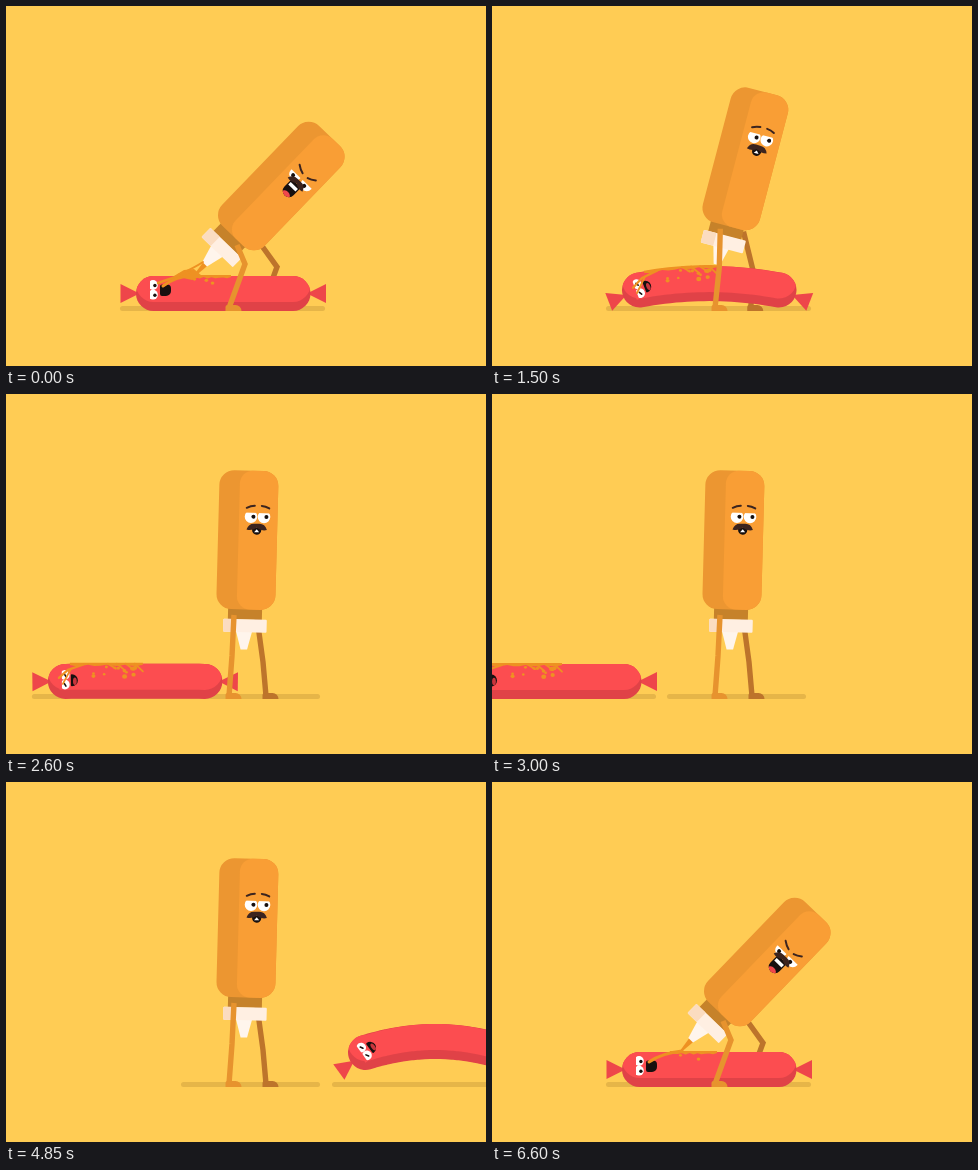
These frames come from a looping animation (480x360 px, 6.65 s). An HTML page with a canvas:

```html
<!DOCTYPE html>
<html lang="en">
<head>
<meta charset="utf-8">
<title>Mustard and sausage</title>
<style>
  html, body { margin: 0; width: 100%; height: 100%; overflow: hidden; background: #ffcc54; }
  canvas { display: block; width: 100vw; height: 100vh; }
</style>
</head>
<body>
<canvas id="stage" width="480" height="360"></canvas>
<script>
const c = document.getElementById('stage').getContext('2d');
const LOOP = 6650, STEP = 50;
const SPRAY = 6350;
const LEFT = 147.5, RIGHT = 287, MID = (LEFT + RIGHT) / 2, HALF = MID - LEFT;
const COL = {
  sky: '#ffcc54', shadow: '#e6b548', light: '#f99e35', side: '#ec9631', neck: '#c6822a',
  cap: '#ffefe2', capSide: '#fbdcc0', leg: '#e7932e', backLeg: '#bd742b',
  sausage: '#fc4d50', under: '#e04247', tail: '#ee464a', mustard: '#ee9122',
  dark: '#3c241f', black: '#17100f', white: '#fff'
};

const mix = (a, b, u) => a + (b - a) * u;
const between = (a, b, u) => [mix(a[0], b[0], u), mix(a[1], b[1], u)];
const clamp = u => Math.min(1, Math.max(0, u));
const rnd = n => Math.abs(Math.sin(n * 127.1 + 11.7) * 43758.5453) % 1;

function ease(from, to, t) {
  const u = clamp((t - from) / (to - from));
  return u * u * (3 - 2 * u);
}

// 1 at the ends of the loop, 0 in its middle
const dip = (a, b, d, e, t) => 1 - ease(a, b, t) + ease(d, e, t);

function poly(pts, color) {
  c.fillStyle = color;
  c.beginPath();
  pts.forEach(p => c.lineTo(...p));
  c.closePath();
  c.fill();
}

function line(pts, width, color, cap = 'round') {
  c.strokeStyle = color;
  c.lineWidth = width;
  c.lineCap = cap;
  c.lineJoin = cap === 'round' ? 'round' : 'miter';
  c.beginPath();
  pts.forEach(p => c.lineTo(...p));
  c.stroke();
}

function curve(a, b, d, width, color) {
  c.strokeStyle = color;
  c.lineWidth = width;
  c.lineCap = 'round';
  c.beginPath();
  c.moveTo(...a);
  c.quadraticCurveTo(...b, ...d);
  c.stroke();
}

function oval(x, y, rx, ry, color) {
  c.fillStyle = color;
  c.beginPath();
  c.ellipse(x, y, rx, ry, 0, 0, 7);
  c.fill();
}

function box(x, y, w, h, r, color) {
  c.fillStyle = color;
  c.beginPath();
  c.roundRect(x, y, w, h, r);
  c.fill();
}

function group(x, y, angle, draw) {
  c.save();
  c.translate(x, y);
  c.rotate(angle);
  draw();
  c.restore();
}

// hops away to the left speeding up, comes back from the right slowing down
function hopAt(t) {
  const leaving = t < 3900;
  const x = leaving
    ? -155 * Math.max(0, (t - 1725) / 1275) ** 1.5
    : 212 * Math.max(0, (5850 - t) / 1000) ** 1.37;
  const active = t > 1300 && t < 5850;
  const turn = leaving ? (t - 1300) / 425 : (t - 4650) / 400;
  const up = active ? Math.sin(Math.PI * turn) ** 2 : 0;
  const power = leaving ? 0 : (x / 212) ** 2;
  return { x, lift: up * (3.5 + 13.5 * power), bend: up * (6.5 + 4.5 * power) };
}

function leg(hip, knee, ankleX, color) {
  line([hip, knee, [ankleX, 302]], 5.4, color, 'butt');
  box(ankleX - 3.5, 299, 16, 6, [2, 6, 0, 0], color);
}

function sausageFace(spraying) {
  const drop = spraying ? 0 : 2;
  for (const y of [-8.5 + drop, 1.2 + drop]) {
    oval(-.5, y, 4.8, 4.9, COL.white);
    if (spraying) oval(1.4, y + .5, 1.7, 1.7, COL.black);
    else line([[-1, y - 1], [.5, y + 1.5]], 1.6, COL.black);
    c.fillStyle = COL.sausage;
    c.fillRect(-6, y - 5, 2.5, 10);
  }
  if (spraying) {
    box(6.5, -9, 11, 11.5, [2, 4, 5, 2], COL.black);
  } else {
    box(5.5, -7, 7, 12, [1, 6, 6, 1], COL.black);
    oval(9.5, 0, 1.9, 3.8, '#c8353c');
  }
}

function splatter(t, warp) {
  const age = (t - SPRAY + LOOP) % LOOP;
  if (age > 4200) return;
  const from = mix(178, 152, clamp((age - 300) / 700));
  const upper = [], lower = [];
  for (let i = 0; i <= 12; i++) {
    const x = mix(from, 225, i / 12);
    upper.push(warp(x, 269));
    lower.unshift(warp(x, 271 + 1.6 * Math.sin(x * .35) ** 2));
  }
  poly(upper.concat(lower), COL.mustard);

  for (let i = 0; i < 12; i++) {
    if (age < 150 + i * 60) break;
    const r = 1.2 + 1.3 * rnd(i + 40);
    oval(...warp(175 + 46 * rnd(i), 273 + 10 * rnd(i + 20) ** 1.5), r, r * .9, COL.mustard);
  }
  for (let i = 0; i < 4; i++) {
    const x = 190 + i * 9;
    if (age > 600 + i * 90) line([warp(x, 270), warp(x + 8, 274 + 4 * rnd(i))], 1.8, COL.mustard);
  }
  if (age > 800) {
    line([warp(165, 271), warp(150, 276), warp(141, 284)], 2.2, COL.mustard);
    line([warp(153, 275), warp(145, 290)], 1.8, COL.mustard);
  }
}

function sausage(t) {
  const { x, lift, bend } = hopAt(t);
  const y = 287.5 - lift;
  const tilt = 4 * bend / HALF;
  const warp = (px, py) =>
    [px, py - lift - bend * Math.max(-.3, 1 - ((px - MID) / HALF) ** 2)];
  c.save();
  c.translate(x, 0);

  const tail = [[-14, 0], [-33, -9.5], [-33, 9.5]];
  group(LEFT, y, -tilt, () => poly(tail, COL.tail));
  group(RIGHT, y, Math.PI + tilt, () => poly(tail, COL.tail));

  const spine = [...Array(25).keys()].map(i => warp(mix(LEFT, RIGHT, i / 24), 287.5));
  const shifted = dy => spine.map(([px, py]) => [px, py + dy]);
  line(spine, 35, COL.under);

  // the lit upper side, kept inside the body outline
  c.save();
  c.beginPath();
  shifted(-17.5).forEach(p => c.lineTo(...p));
  c.arc(RIGHT, y, 17.5, -Math.PI / 2, Math.PI / 2);
  shifted(17.5).reverse().forEach(p => c.lineTo(...p));
  c.arc(LEFT, y, 17.5, Math.PI / 2, Math.PI * 1.5);
  c.clip();
  line(shifted(-9), 35, COL.sausage);
  c.restore();

  group(LEFT, y, -tilt, () => sausageFace(t < 1150 || t > SPRAY));
  splatter(t, warp);
  c.restore();
}

function bottleFace(t) {
  const anger = dip(800, 1300, 5450, 5850, t);
  const laugh = dip(800, 1300, 5700, 6250, t);
  const blink = Math.abs(t - 3950) < 60 || Math.abs(t - 4600) < 60;
  const lid = blink ? .9 : mix(.2, .45, anger);
  const eyeY = mix(-93, -88, anger), r = 6.3;

  for (const ex of [mix(3, 2, laugh), mix(16, 17.5, laugh)]) {
    c.save();
    c.beginPath();
    c.rect(ex - 8, eyeY - r + lid * 2 * r, 16, 16);
    c.clip();
    oval(ex, eyeY, r, r, COL.white);
    oval(ex + mix(2.4, -1, anger), eyeY + anger * 2.5, 2, 2, COL.black);
    c.restore();
  }

  const arch = mix(-1, 1, anger);
  const brow = (outer, inner) => {
    const a = [outer, mix(-101.7, -97.5, anger)], b = [inner, mix(-104, -93.5, anger)];
    const [mx, my] = between(a, b, .5);
    curve(a, [mx, my + arch], b, 2, COL.dark);
  };
  brow(-1.5, 6.5);
  brow(21, 13.5);

  const w = mix(4.6, 6.3, laugh), bottom = mix(-75, -65, laugh);
  c.save();
  c.beginPath();
  c.roundRect(9 - w, -82, 2 * w, bottom + 82, [0, 0, w, w]);
  c.clip();
  c.fillStyle = COL.black;
  c.fillRect(0, -82, 20, 20);
  if (laugh > .3) {
    oval(9, -66, 5, 4, '#f0484c');
    c.fillStyle = COL.white;
    c.fillRect(4, -79, 10, 3.6);
  } else {
    poly([[6.5, -77.5], [9, -80.5], [11.5, -77.5]], COL.white);
  }
  c.restore();

  // moustache
  c.fillStyle = COL.dark;
  c.beginPath();
  c.moveTo(-1.2, -80);
  c.quadraticCurveTo(1, -86.5, 7, -86);
  c.lineTo(11, -86);
  c.quadraticCurveTo(17, -86.5, 19.2, -80);
  c.quadraticCurveTo(14, -78.5, 9, -82);
  c.quadraticCurveTo(4, -78.5, -1.2, -80);
  c.fill();
}

function bottle(t, base, lean, spraying) {
  group(...base, lean * Math.PI / 180, () => {
    if (spraying) poly([[-3.5, 38], [2.5, 38], [.8, 55], [-1, 55]], COL.mustard);
    box(-17.5, -3, 34, 13, 0, COL.neck);
    poly([[-9, 22], [7, 22], [2.5, 40], [-4, 40]], '#fff5ec');
    box(-22, 9.7, 43.5, 13, 1, COL.cap);
    box(-22, 9.7, 13, 13, 1, COL.capSide);
    box(-29.5, -139, 59, 139, 15, COL.side);
    box(-9, -139, 38.5, 139, [13, 15, 15, 13], COL.light);
    bottleFace(t);
  });
}

function stream(t) {
  curve([190, 269], [170, 270 + Math.sin(t / 40)], [157, 280], 3, COL.mustard);
  // short bursts around the jet
  if (t < 950 && t % 250 < 150) {
    curve([172, 269], [188, 262], [197, 256], 2, COL.mustard);
    poly([[168, 270], [178, 264], [188, 263], [196, 270], [186, 274]], COL.mustard);
    line([[184, 266], [152, 277]], 2.4, COL.mustard);
  }
}

function render(t) {
  const spraying = t < 1000 || t >= SPRAY + 60;
  const shake = t < 750 ? (1 - Math.cos(t * Math.PI / 125)) * .9 : 0;
  const bow = dip(840, 1890, 5530, 6550, t);
  const crouch = bow * bow;

  c.fillStyle = COL.sky;
  c.fillRect(0, 0, 480, 360);
  box(175, 300, 139, 5, 2.5, COL.shadow);
  box(114 + hopAt(t).x, 300, 205, 5, 2.5, COL.shadow);

  leg(between([251, 224], [256, 240], crouch), between([257, 268], [271, 261], bow),
    mix(260, 256, bow), COL.backLeg);
  sausage(t);
  bottle(t, between([239.6, 215.5], [227, 230], bow), mix(1.5, 44, bow) + shake, spraying);
  if (spraying) stream(t);
  leg(between([228, 221], [231, 239], crouch), between([226, 262], [239, 258], crouch),
    223, COL.leg);
}

const start = performance.now();
function frame() {
  const t = (performance.now() - start) % LOOP;
  render(Math.floor(t / STEP) * STEP);
  requestAnimationFrame(frame);
}
frame();
</script>
</body>
</html>
```
